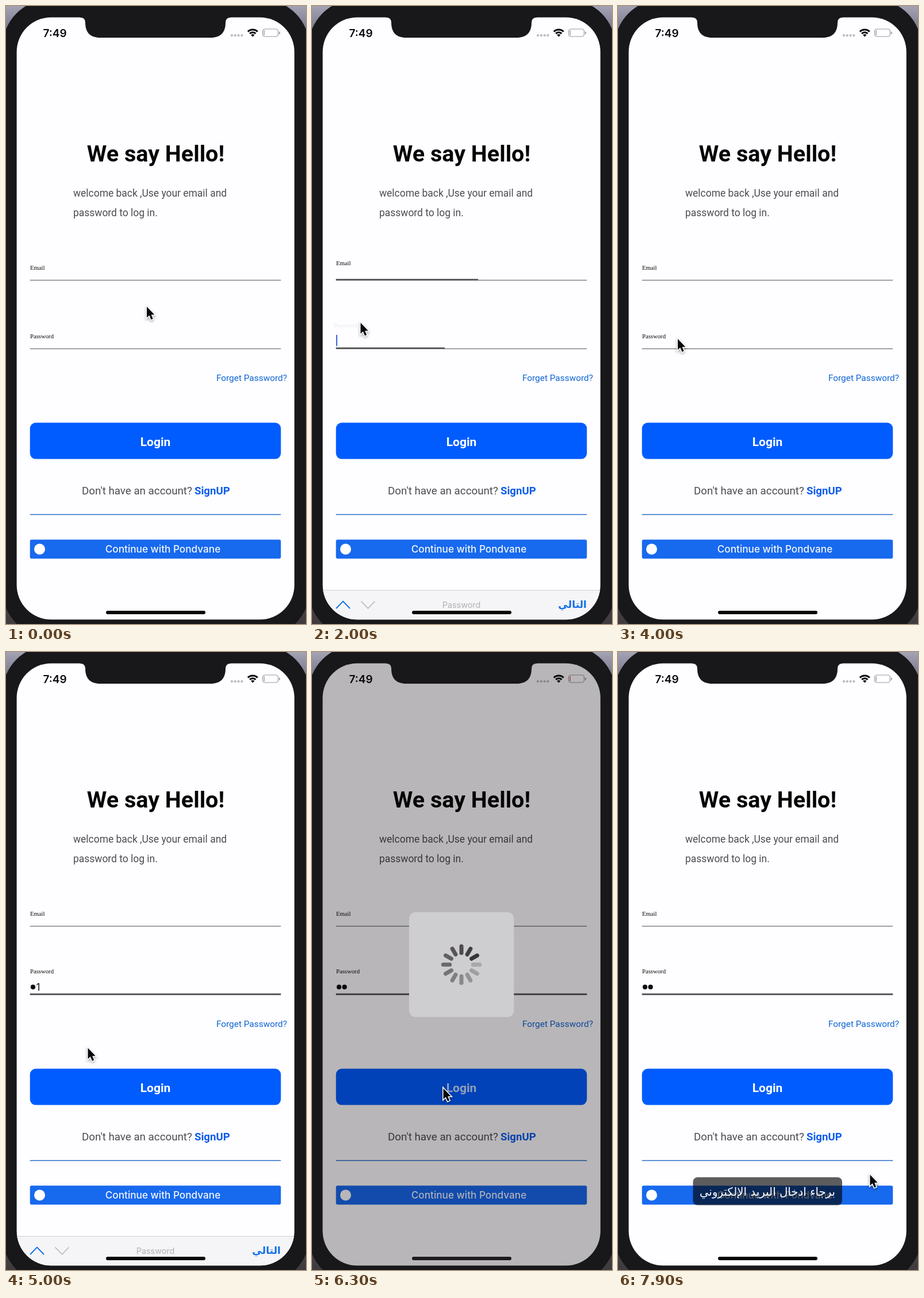
Write an HTML page with a canvas that moves like this. It is 522 px wide and 1073 px high and loops after 8 s.

```html
<!DOCTYPE html>
<html lang="en">
<head>
<meta charset="utf-8">
<title>Login screen</title>
<style>
  html, body { margin: 0; width: 100%; height: 100%; overflow: hidden; background: #18171a; }
  canvas { display: block; width: 522px; height: 1073px; }
</style>
</head>
<body>
<canvas id="stage" width="522" height="1073"></canvas>
<script>
const ctx = document.getElementById('stage').getContext('2d');
const LOOP = 8000, STEP = 100;
const BODY = 'Roboto, sans-serif', UI = 'Inter, sans-serif';
const SERIF = '"Liberation Serif", serif', ARABIC = '"DejaVu Sans", sans-serif';
const LEFT = 41.7, WIDTH = 436.6;

const lerp = (a, b, k) => a + (b - a) * k;
const ramp = (t, from, to) => Math.min(1, Math.max(0, (t - from) / (to - from)));
const smooth = k => k * k * (3 - 2 * k);

// time, x, y of the pointer tip
const PATH = [
  [0, 245, 522], [200, 245, 522], [900, 108, 464], [1200, 108, 464],
  [1700, 84.5, 550], [2200, 84.5, 550], [2800, 95.5, 668.5], [3400, 95.5, 668.5],
  [3900, 104, 578], [4200, 104, 578], [4800, 142.5, 687.5], [5200, 142.5, 687.5],
  [5800, 227, 757.5], [6300, 228.5, 757.5], [6700, 228.5, 757.5], [7600, 438.5, 907.5], [8000, 438.5, 907.5]
];
const EMAIL = { name: 'Email', y: 476, spans: [[1050, 1870]], keep: false };
const PASSWORD = { name: 'Password', y: 595, spans: [[1870, 2850], [4100, 5850]], keep: true };
const TYPED = [4500, 4900];
const BARS = [[1050, 2850], [4100, 5850]];

function text(str, x, y, font, color, align = 'left', dir = 'ltr') {
  ctx.font = font;
  ctx.fillStyle = color;
  ctx.textAlign = align;
  ctx.direction = dir;
  ctx.fillText(str, x, y);
}

function box(x, y, w, h, r, color) {
  ctx.beginPath();
  ctx.roundRect(x, y, w, h, r);
  ctx.fillStyle = color;
  ctx.fill();
}

function disc(x, y, r, color) {
  ctx.beginPath();
  ctx.arc(x, y, r, 0, 7);
  ctx.fillStyle = color;
  ctx.fill();
}

function stroke(points, color, width) {
  ctx.beginPath();
  points.forEach(p => ctx.lineTo(...p));
  ctx.strokeStyle = color;
  ctx.lineWidth = width;
  ctx.stroke();
}

function drawBody() {
  const g = ctx.createLinearGradient(0, 0, 0, 1073);
  g.addColorStop(0, '#a3a3b4');
  g.addColorStop(0.04, '#77778a');
  g.addColorStop(0.9, '#5a5557');
  g.addColorStop(1, '#3f3a3b');
  ctx.fillStyle = g;
  ctx.fillRect(0, 0, 522, 1073);
  box(-6, -11, 534, 1107, 82, '#18171a');
}

function drawNotch() {
  ctx.beginPath();
  ctx.moveTo(129, 19);
  ctx.lineTo(129, 20);
  ctx.quadraticCurveTo(138, 20, 138, 29);
  ctx.bezierCurveTo(138, 46, 147, 55, 164, 55);
  ctx.lineTo(356, 55);
  ctx.bezierCurveTo(373, 55, 382, 46, 382, 29);
  ctx.quadraticCurveTo(382, 20, 391, 20);
  ctx.lineTo(391, 19);
  ctx.fillStyle = '#18171a';
  ctx.fill();
}

function drawStatus(dim) {
  text('7:49', 85, 53.5, '600 19px ' + UI, '#0b0a0c', 'center');
  for (let i = 0; i < 4; i++) box(391 + i * 5.8, 49, 4, 4, 1.5, '#bdbcc0');

  const a = -Math.PI * 0.75, b = -Math.PI * 0.25;
  ctx.strokeStyle = '#0b0a0c';
  ctx.lineWidth = 3;
  for (const r of [7.3, 12]) {
    ctx.beginPath();
    ctx.arc(429.3, 53, r, a, b);
    ctx.stroke();
  }
  ctx.beginPath();
  ctx.moveTo(429.3, 53.5);
  ctx.arc(429.3, 53.5, 4.5, a, b);
  ctx.fillStyle = '#0b0a0c';
  ctx.fill();

  ctx.beginPath();
  ctx.roundRect(446.5, 40, 27, 13, 4);
  ctx.strokeStyle = '#9a999d';
  ctx.lineWidth = 1.2;
  ctx.stroke();
  box(475, 44.5, 1.8, 4.5, 1, '#9a999d');
  box(448.4, 42, 1.6, 9, 0.8, dim ? '#e2695f' : '#a9a4a6');
}

function drawForm(t) {
  text('We say Hello!', 260.5, 269.5, '700 39.5px ' + BODY, '#050505', 'center');
  const note = '17.45px ' + BODY, grey = '#4c4b4f';
  text('welcome back ,Use your email and', 117, 330.5, note, grey);
  text('password to log in.', 117, 364.5, note, grey);
  text('Forget Password?', 489, 650.5, '15.4px ' + BODY, '#0f66d4', 'right');

  box(LEFT, 723.6, WIDTH, 63, 10, '#005cff');
  const pressed = ramp(t, 5850, 5900) - ramp(t, 6100, 6370);
  ctx.globalAlpha = 1 - 0.8 * pressed;
  text('Login', 260, 763.5, '700 21px ' + BODY, '#fff', 'center');
  ctx.globalAlpha = 1;

  text("Don't have an account?", 132, 847.5, '18.75px ' + BODY, grey);
  text('SignUP', 328, 847.5, '700 18.6px ' + BODY, '#0a5cee');
  ctx.fillStyle = '#2a6fc9';
  ctx.fillRect(LEFT, 882.2, WIDTH, 1.5);

  box(LEFT, 926.6, WIDTH, 32.8, 3, '#1769ee');
  disc(58.5, 943, 9.5, '#fff');
  text('Continue with Pondvane', 273, 949.3, '500 17.2px ' + UI, '#f4f7ff', 'center');
}

function drawField(f, t) {
  let fill = 0, label = { x: 42, y: f.y - 18, alpha: 1 };
  const last = f.spans.length - 1;
  f.spans.forEach(([on, off], i) => {
    const stays = f.keep && i === last;
    if (t < on) return;
    if (t < off || stays) {
      fill = ramp(t, on, on + 300);
      label = { x: 42 - 7 * (1 - fill), y: f.y - 37.2, alpha: ramp(fill, 0.38, 1) };
    } else {
      const k = ramp(t, off, off + 300);
      fill = 1 - k;
      label = { x: 42, y: lerp(f.y - 37.2, f.y - 18, 1 - (1 - k) ** 1.6), alpha: 1 };
    }
  });

  ctx.fillStyle = '#69686c';
  ctx.fillRect(LEFT, f.y - 0.5, WIDTH, 1.2);
  ctx.fillStyle = '#525155';
  ctx.fillRect(LEFT, f.y - 2.2, WIDTH * fill, 2.4);

  ctx.globalAlpha = label.alpha;
  text(f.name, label.x, label.y, '10.7px ' + SERIF, '#080808');
  ctx.globalAlpha = 1;

  const count = f.keep ? TYPED.filter(at => t >= at).length : 0;
  for (let i = 0; i < count; i++) {
    const x = 47 + i * 9.6;
    const shown = i === count - 1 && t < 5850;
    if (shown) text('1', x - 0.7, 588, '17px ' + UI, '#111', 'center');
    else disc(x, 581.7, 4.1, '#0b0a0c');
  }

  const focus = f.spans.find(([on, off]) => t >= on && t < off);
  if (focus && (t - focus[0]) % 1000 < 650) {
    ctx.fillStyle = '#3d68d6';
    ctx.fillRect(42 + count * 9.6, f.y - 24, 2, 19.5);
  }
}

function drawToolbar(t) {
  let rise = 0;
  for (const [on, off] of BARS) rise += smooth(ramp(t, on, on + 250)) - smooth(ramp(t, off, off + 250));
  if (rise <= 0) return;
  const onEmail = t < 1870, blue = '#0f70ea', pale = '#c3c2c6';
  ctx.save();
  ctx.translate(0, (1 - rise) * 52);
  ctx.fillStyle = '#f5f4f6';
  ctx.fillRect(18, 1014, 485, 52);
  ctx.fillStyle = '#cfced2';
  ctx.fillRect(18, 1014, 485, 1);
  stroke([[42, 1046], [54, 1033.5], [66, 1046]], onEmail ? pale : blue, 1.9);
  stroke([[85.5, 1033.5], [97.5, 1046], [109.5, 1033.5]], onEmail ? blue : pale, 1.9);
  text(onEmail ? 'Email' : 'Password', 260, 1045, '14.4px ' + UI, '#b1b0b4', 'center');
  text('التالي', 478, 1044.5, '700 17.2px ' + ARABIC, blue, 'right', 'rtl');
  ctx.restore();
}

function drawToast(t) {
  const alpha = ramp(t, 7350, 7600);
  if (!alpha) return;
  ctx.globalAlpha = alpha;
  box(130.5, 912, 259.5, 48.5, 8, 'rgba(0,0,0,.63)');
  text('برجاء ادخال البريد الإلكتروني', 260, 943.5, '19.8px ' + ARABIC, '#fff', 'center', 'rtl');
  ctx.globalAlpha = 1;
}

function drawSpinner(t, dim) {
  const alpha = t < 6050 ? 0 : 1 - ramp(t, 7250, 7450);
  if (!alpha) return;
  ctx.globalAlpha = alpha;
  const v = Math.round(lerp(235, 206, dim));
  box(169, 451.8, 182.3, 182, 11, `rgb(${v},${v - 1},${v + 1})`);
  const head = Math.floor((t - 6100) / 1000 * 12 + 0.01);
  ctx.lineCap = 'round';
  for (let i = 0; i < 12; i++) {
    const a = (head - i) * Math.PI / 6 - Math.PI / 2;
    const c = Math.cos(a), s = Math.sin(a);
    const shade = lerp(0.8, 0.2, i / 11);
    stroke([[260 + c * 20.3, 542.7 + s * 20.3], [260 + c * 31.7, 542.7 + s * 31.7]], `rgba(18,16,20,${shade})`, 7);
  }
  ctx.lineCap = 'butt';
  ctx.globalAlpha = 1;
}

function drawPointer(t) {
  const i = Math.max(1, PATH.findIndex(p => p[0] > t));
  const [t0, x0, y0] = PATH[i - 1], [t1, x1, y1] = PATH[i];
  const k = smooth(ramp(t, t0, t1));
  ctx.save();
  ctx.translate(lerp(x0, x1, k), lerp(y0, y1, k));
  ctx.beginPath();
  [[0, 0], [0, 19], [4.3, 15.1], [7.5, 22.4], [10.7, 21], [7.6, 14], [13.2, 13.8]]
    .forEach(p => ctx.lineTo(...p));
  ctx.closePath();
  ctx.shadowColor = 'rgba(0,0,0,.35)';
  ctx.shadowBlur = 4;
  ctx.shadowOffsetY = 2;
  ctx.strokeStyle = '#fff';
  ctx.lineWidth = 3;
  ctx.stroke();
  ctx.shadowColor = 'transparent';
  ctx.fillStyle = '#080808';
  ctx.fill();
  ctx.restore();
}

function draw(t) {
  const dim = ramp(t, 6095, 6290) - ramp(t, 7250, 7450);
  drawBody();
  ctx.save();
  ctx.beginPath();
  ctx.roundRect(18.6, 19.8, 483.2, 1045.4, 60);
  ctx.clip();
  ctx.fillStyle = '#fefdff';
  ctx.fillRect(0, 0, 522, 1073);
  drawStatus(dim > 0.5);
  drawForm(t);
  drawField(EMAIL, t);
  drawField(PASSWORD, t);
  drawToolbar(t);
  ctx.fillStyle = `rgba(6,0,6,${0.282 * dim})`;
  ctx.fillRect(0, 0, 522, 1073);
  drawSpinner(t, dim);
  drawToast(t);
  box(174, 1050, 173, 6, 3, dim > 0.5 ? '#1b1a1c' : '#050505');
  ctx.restore();
  drawNotch();
  drawPointer(t);
}

const start = performance.now();
function tick() {
  const t = (performance.now() - start) % LOOP;
  draw(Math.floor(t / STEP) * STEP);
  requestAnimationFrame(tick);
}
tick();
</script>
</body>
</html>
```
